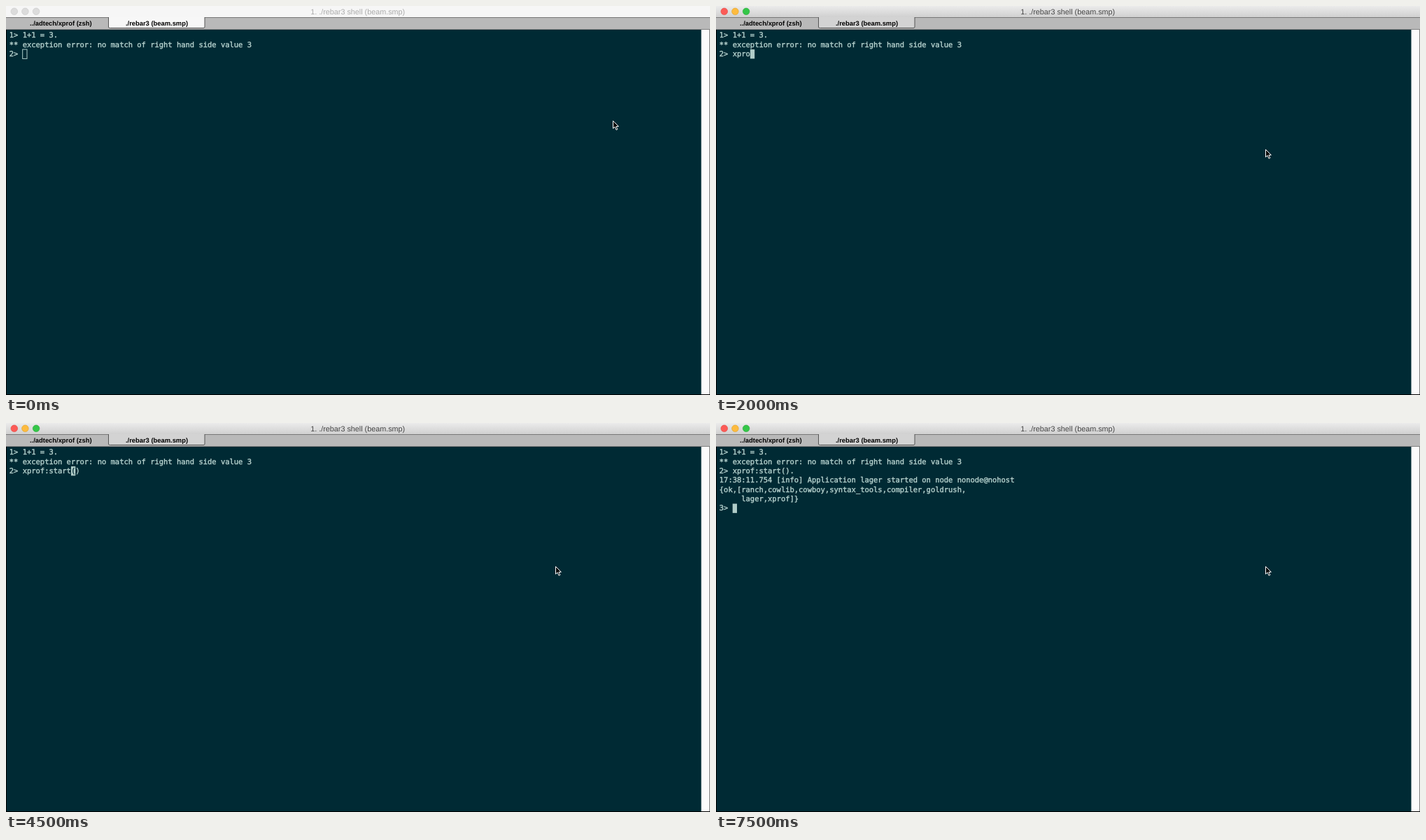
Animation, 1006 px wide and 557 px high, one loop 8 s. Source, as an HTML page:

```html
<!DOCTYPE html>
<html lang="en">
<head>
<meta charset="utf-8">
<title>Erlang shell</title>
<style>
  html, body { margin: 0; width: 100%; height: 100%; overflow: hidden; background: #000; }
  svg { display: block; }
  text { white-space: pre; text-rendering: geometricPrecision; }
  .title { font: 10.8px "Liberation Sans", Arial, sans-serif; text-anchor: middle; }
  .tab { font: bold 9.4px "Liberation Sans", Arial, sans-serif; text-anchor: middle; }
  .term { font: 10.46px "DejaVu Sans Mono", monospace; fill: #b9d4d0; stroke: #b9d4d0; stroke-width: .35; }
</style>
</head>
<body>
<svg width="1006" height="557" viewBox="0 0 1006 557">
  <defs>
    <linearGradient id="bar" x2="0" y2="1">
      <stop stop-color="#ebebeb"/><stop offset="1" stop-color="#d0d0d0"/>
    </linearGradient>
  </defs>
  <rect id="titlebar" width="1006" height="16"/>
  <g id="lights" stroke-width=".6">
    <circle cx="11.8" cy="7.8" r="4.8"/>
    <circle cx="27.4" cy="7.8" r="4.8"/>
    <circle cx="43.1" cy="7.8" r="4.8"/>
  </g>
  <text id="title" class="title" x="502.7" y="11.8">1. ./rebar3 shell (beam.smp)</text>

  <rect y="16" width="1006" height="17" fill="#b9b9b9"/>
  <path d="M0 16.5H147M284 16.5H1006" stroke="#777"/>
  <path d="M0 33.5H1006" stroke="#808080"/>
  <path id="tab" d="M146.5 16V30Q146.5 31.5 148.5 31.5H282Q284 31.5 284 30V16" stroke="#555"/>
  <text class="tab" x="78.3" y="28">../adtech/xprof (zsh)</text>
  <text class="tab" x="215.5" y="27.5">./rebar3 (beam.smp)</text>

  <rect x="1" y="34" width="993" height="522" fill="#002a34"/>
  <rect x="993.5" y="34" width="12" height="522" fill="#fcfcfc"/>
  <g id="lines" class="term"></g>
  <rect id="caret" width="6.3" height="13.3" stroke="#b0ccc8"/>
  <text id="under" class="term" style="fill:#002a34;stroke:#002a34"></text>
  <path id="mouse" d="M.5 .5V11.3L3 9 5 13.4 6.8 12.6 4.9 8.4H8.3Z" fill="#000" stroke="#fff"/>
</svg>
<script>
const $ = id => document.getElementById(id);
const LOOP = 8000, LEFT = 4.8, TOP = 35.4, CELL = 6.297, ROW = 13.36, BASELINE = 9.9;
const intro = ["1> 1+1 = 3.", "** exception error: no match of right hand side value 3"];
const output = [
  "17:38:11.754 [info] Application lager started on node nonode@nohost",
  "{ok,[ranch,cowlib,cowboy,syntax_tools,compiler,goldrush,",
  "     lager,xprof]}",
  "3> "
];
const command = "xprof:start().";
// [time, characters typed]
const typing = [
  [0, 0], [1250, 1], [1500, 2], [2000, 4], [2250, 5], [2750, 6], [3000, 7], [3250, 8],
  [3500, 9], [3750, 10], [4000, 11], [4250, 12], [4500, 13], [5250, 14]
];

const rows = Array.from({ length: 7 }, (_, row) => {
  const line = document.createElementNS("http://www.w3.org/2000/svg", "text");
  place(line, 0, row, BASELINE);
  return $("lines").appendChild(line);
});

function set(el, attrs) {
  for (const name in attrs) el.setAttribute(name, attrs[name]);
}

function place(el, col, row, dy = 0) {
  set(el, { x: LEFT + col * CELL, y: TOP + row * ROW + dy });
}

function drawWindow(t) {
  const active = t >= 500;
  $("titlebar").setAttribute("fill", active ? "url(#bar)" : "#f6f6f6");
  $("title").setAttribute("fill", active ? "#444" : "#aaa");
  $("tab").setAttribute("fill", active ? "#d3d3d3" : "#f7f7f7");
  const fills = ["#fc5b57", "#fdbb3f", "#34c648"], edges = ["#e2443f", "#dfa023", "#24a936"];
  [...$("lights").children].forEach((dot, i) =>
    set(dot, { fill: active ? fills[i] : "#dcdcdc", stroke: active ? edges[i] : "#c6c6c6" }));
  $("mouse").setAttribute("transform", t < 250 ? "translate(867 164)" : "translate(785 205)");
}

function drawShell(t) {
  const typed = typing.findLast(([start]) => start <= t)[1];
  const lines = [...intro, "2> " + command.slice(0, typed)];
  if (t >= 6500) lines.push(...output);
  else if (t >= 6000) lines.push("");
  rows.forEach((line, i) => line.textContent = lines[i] || "");

  const row = lines.length - 1;
  // The shell briefly jumps back to the matching parenthesis.
  const matching = t >= 4500 && t < 5250;
  const col = matching ? lines[row].indexOf("(") : lines[row].length;
  place($("caret"), col, row);
  place($("under"), col, row, BASELINE);
  $("under").textContent = matching ? "(" : "";
  const hollow = t < 500;
  set($("caret"), { fill: hollow ? "none" : "#b0ccc8", "stroke-width": hollow ? 1 : 0 });
}

function frame() {
  const t = performance.now() % LOOP;
  drawWindow(t);
  drawShell(t);
  requestAnimationFrame(frame);
}
frame();
</script>
</body>
</html>
```
